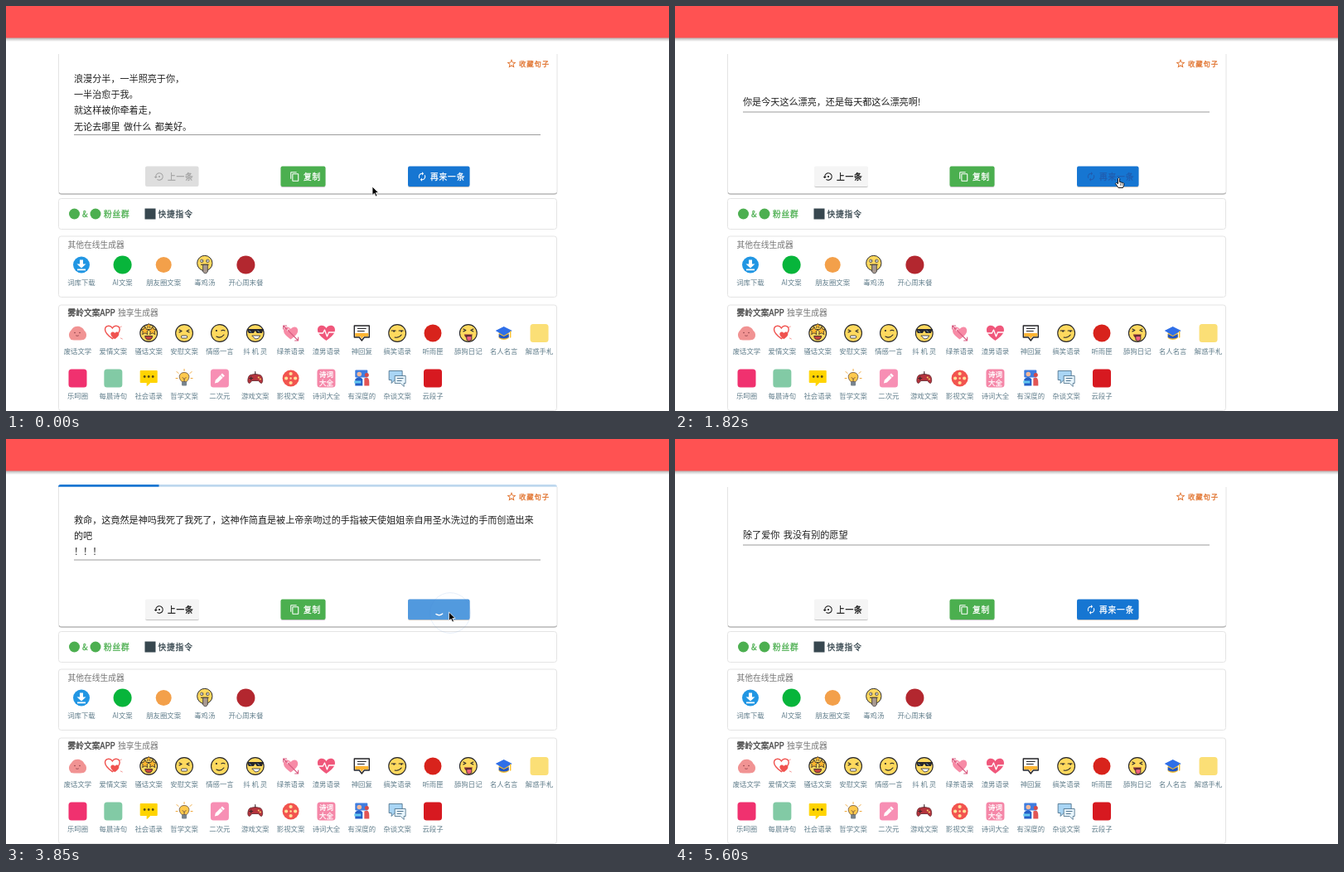
Write an HTML page that moves like this. It is 800 px wide and 489 px high and loops after 5.88 s.

```html
<!DOCTYPE html>
<html lang="zh-CN">
<head>
<meta charset="utf-8">
<title>文案生成器</title>
<style>
html, body { margin: 0; width: 100%; height: 100%; overflow: hidden; background: #fff; }
svg { display: block; width: 100%; height: 100%; }
text { font-family: "Noto Sans CJK SC", "Noto Sans CJK", "Noto Sans", sans-serif; white-space: pre; }
.mid { text-anchor: middle; }
.quote { word-spacing: 2px; }
.btn { letter-spacing: .87px; }
.btn, .med { font-weight: 500; stroke-width: .28px; }
.line { fill: none; stroke-linecap: round; stroke-linejoin: round; }
</style>
</head>
<body>
<svg id="stage" viewBox="0 0 800 489" xmlns="http://www.w3.org/2000/svg"></svg>
<script>
const LOOP = 5880;
const BLUE = '#1976d2', GREEN = '#4caf50', INK = '#26262a', YELLOW = '#ffd95e';

// Drawing helpers; text is placed by the vertical centre of its glyphs.
const text = (x, y, s, size, fill, cls = '') =>
  `<text x="${x}" y="${y + size * .38}" font-size="${size}" fill="${fill}" class="${cls}" ${/btn|med/.test(cls) ? `stroke="${fill}"` : ''}>${s}</text>`;
const at = (x, y, body, scale = 1) => `<g transform="translate(${x} ${y}) scale(${scale})">${body}</g>`;
const rect = (x, y, w, h, fill, r = 0, more = '') =>
  `<rect x="${x}" y="${y}" width="${w}" height="${h}" rx="${r}" fill="${fill}" ${more}/>`;
const disc = (x, y, r, fill, more = '') => `<circle cx="${x}" cy="${y}" r="${r}" fill="${fill}" ${more}/>`;
const path = (d, fill, more = '') => `<path d="${d}" fill="${fill}" ${more}/>`;
const line = (d, color = INK, w = 1.1) => `<path class="line" d="${d}" stroke="${color}" stroke-width="${w}"/>`;
const glyph = (x, y, d, fill, scale = .53) => at(x, y, at(-12, -12, path(d, fill)), scale);
const tile = (fill, body = '') => rect(-11, -11, 22, 22, fill, 3.5) + body;
const thin = `stroke="${INK}" stroke-width=".8"`;
const face = body => disc(0, 0, 10.4, YELLOW, `stroke="${INK}" stroke-width="1.1"`) + body;
const star = (x, y, s) => at(x, y, path('M0-5 1.5-1.7 5-1.4 2.4 1 3.1 4.6 0 2.8-3.1 4.6-2.4 1-5-1.4-1.5-1.7Z', '#ffb52e', thin), s);
const HEART = 'M0 9C-7 4-10.500 .5-10.500-4C-10.500-10-3-11 0-6C3-11 10.500-10 10.500-4C10.500 .5 7 4 0 9Z';

const COPY = 'M16 1H4c-1.100 0-2 .9-2 2v14h2V3h12V1zm3 4H8c-1.100 0-2 .9-2 2v14c0 1.100.9 2 2 2h11c1.100 0 2-.9 2-2V7c0-1.100-.9-2-2-2zm0 16H8V7h11v14z';
const RESTORE = 'M14 12a2 2 0 1 0-4 0a2 2 0 1 0 4 0zM12 3a9 9 0 0 0-9 9H0l4 4 4-4H5a7 7 0 1 1 2.940 5.700l-1.420 1.440A9 9 0 1 0 12 3z';
const RENEW = 'M12 6v3l4-4-4-4v3a8 8 0 0 0-6.760 12.260L6.700 14.800A6 6 0 0 1 12 6zm6.760 1.740L17.300 9.200A6 6 0 0 1 12 18v-3l-4 4 4 4v-3a8 8 0 0 0 6.760-12.260z';
const STAR = 'M22 9.240l-7.190-.62L12 2 9.190 8.630 2 9.240l5.460 4.730L5.820 21 12 17.270 18.180 21l-1.630-7.030zM12 15.400l-3.760 2.270 1-4.280-3.320-2.880 4.380-.38L12 6.100l1.710 4.040 4.380.38-3.320 2.880 1 4.280z';

const onlineTools = [
  ['词库下载', disc(0, 0, 10, '#2196e3') + path('M-2-6H2V-1H5.500L0 4-5.500-1H-2ZM-5 5H5V6.800H-5Z', '#fff')],
  ['AI文案', disc(0, 0, 11, '#07b53b')],
  ['朋友圈文案', disc(0, 0, 9.5, '#f3a04a')],
  ['毒鸡汤', at(0, -2, face(disc(-4, -3, 2, '#fff', thin) + disc(4, -3, 2, '#fff', thin) + disc(-3.5, -3, .8, INK) + disc(3.5, -3, .8, INK) +
    line('M-5 2H5') + path('M-2.500 2H4V12Q1 16-2.500 12Z', '#a99a90', thin)), .88)],
  ['开心周末餐', disc(0, 0, 11, '#b3272f')]
];

const appTools = [
  ['废话文学', path('M-10 5C-12-1-8-3-6-6C-2-10 6-8 8-3C12 0 11 7 7 8Q-1 9-8 8Z', '#f19393') +
    disc(-3.5, -.5, .8, '#8d3f49') + disc(2.5, -.5, .8, '#8d3f49') + line('M-2 3Q-.5 4 1 3', '#8d3f49', .8)],
  ['爱情文案', at(-1, -1, path(HEART, '#fff', 'stroke="#f0524f" stroke-width="1.700"'), .84) +
    at(2, 3, path(HEART, '#f0524f'), .48) + line('M8-7 10-8M9 6 11 7', '#f59a98', 1)],
  ['骚话文案', face(star(-4.5, -3, 1) + star(4.5, -3, 1) + path('M-4.500 3.500H4.500Q4 8 0 8T-4.500 3.500Z', '#c2453f', thin)) + star(0, -9, .6)],
  ['安慰文案', face(line('M-6-4-3-2.500-6-1M6-4 3-2.500 6-1') + rect(-3.5, 3, 7, 3, '#fff', 1, thin))],
  ['情感一言', face(disc(-4, -3, 1.1, INK) + line('M2-3Q4-4.500 6-3M-4 4Q1 7 5 2'))],
  ['抖 机 灵', face(path('M-10-5H10L8 0H2L0-3-2 0H-8Z', INK) + line('M-7-3-5-1M3-3 5-1', '#7ea6ce', 1) +
    path('M-4 3H6Q4 8 0 7Z', '#fff', thin))],
  ['绿茶语录', at(0, 0, path(HEART, '#f78ba6'), .82) + line('M-9-9 9 9M5 9H9V5M-9-5V-9H-5', '#d95f83', 1.1) + line('M-4-3Q-5-5-2-5', '#fff', 1)],
  ['渣男语录', path(HEART, '#f0577b') + line('M-10 0H-4L-2-4 1 4 3-1H10', '#fff', 1.3)],
  ['神回复', path('M-9-9H9V5H3L0 9-3 5H-9Z', '#fff', `stroke="${INK}" stroke-width="1.4" stroke-linejoin="round"`) +
    path('M-8 0H8V4H2L0 7-2 4H-8Z', '#ffb534') + line('M-5-5.500H5M-5-2.500H3', INK, 1)],
  ['搞笑语录', face(line('M-7-3H-2M2-3H7') + disc(-4, -2.3, 1, INK) + disc(5, -2.3, 1, INK) + line('M-3 5Q2 6 5 2'))],
  ['听雨匣', disc(0, 0, 10.5, '#d8231c')],
  ['舔狗日记', face(line('M-6-5-3-3.500-6-2M6-5 3-3.500 6-2') + path('M-5 1.500H5Q4 6 0 6T-5 1.500Z', '#7b2d35') +
    path('M-2 3.500H4V8Q1 11-2 8Z', '#f2607b', thin))],
  ['名人名言', path('M-6-1V6Q0 10 6 6V-1Z', '#fbc02d') + path('M0-8 10-3 0 3-10-3Z', '#2f6fe8') +
    path('M-6 1 0 4 6 1V5Q0 8-6 5Z', '#1f55c6') + line('M8-2V5', '#fbc02d', 1.4)],
  ['解惑手札', tile('#fbdf76')],
  ['乐呵圈', tile('#f0316f')],
  ['每晨诗句', tile('#82caa5')],
  ['社会语录', path('M-10-9H10V5H2L-2 9V5H-10Z', '#ffd400', 'stroke="#ffd400" stroke-linejoin="round"') +
    [-5, 0, 5].map(x => disc(x, -2, 1.4, '#5a4a16')).join('')],
  ['哲学文案', path('M-3 4C-8-1-6-7 0-7S8-1 3 4Z', '#ffc94d', 'stroke="#604b3d" stroke-width=".8"') + rect(-3, 4, 6, 5, '#78848e', 1) +
    line('M-2-1 0 1 2-1M0 1V4', '#604b3d', .9) + line('M0-11V-9M-9-8-7-6M9-8 7-6M-10 0H-8M10 0H8', '#f0a83b', 1)],
  ['二次元', tile('#f78fb4', path('M-6 6-5 2 3-6 6-3-2 5Z', '#fff') + line('M1-4 4-1', '#f78fb4', 1))],
  ['游戏文案', path('M-6-4Q0-6 6-4C9-3 10 5 7.500 6Q6 6 4 3H-4Q-6 6-7.500 6C-10 5-9-3-6-4Z', '#b5343d', 'stroke="#5d262d" stroke-width=".8"') +
    line('M-5-2V2M-7 0H-3M0-5V-8', '#3b2529', 1.1) + disc(4, -1, 1, '#ffd86b') + disc(6, 1, 1, '#ffd86b')],
  ['影视文案', disc(0, 0, 10, '#f2544f') + [[0, -5.5], [5.5, 0], [0, 5.5], [-5.5, 0]].map(p => disc(p[0], p[1], 2.1, '#ffe09a')).join('') + disc(0, 0, 1.2, '#ffe09a')],
  ['诗词大全', tile('#f587a8', text(0, -4.5, '诗词', 8.5, '#fff', 'mid med') + text(0, 5, '大全', 8.5, '#fff', 'mid med'))],
  ['有深度的', rect(-8, -10, 15, 9, '#3f7de0', 1) + disc(-3, -5, 2.8, '#f2b89a') + disc(6, -4, 2.5, '#d34b4b') +
    path('M-8 9V1Q-3-4 1 1V9Z', '#2460c8') + path('M3 9V0Q9-3 9 5V9Z', '#e25555') + rect(-9, 3, 8, 3, '#64c7ef')],
  ['杂谈文案', path('M-10-9H6V2H-3L-7 6V2H-10Z', '#a9d5f4', 'stroke="#426985" stroke-width=".8"') +
    path('M-3-3H10V6H8V10L4 6H-3Z', '#e8f5fd', 'stroke="#426985" stroke-width=".8"') + line('M0 0H7M0 3H5', '#426985', .9)],
  ['云段子', tile('#d71920')]
];

const toolIcon = ([label, icon], x, y, gap) => at(x, y, icon) + text(x, y + gap, label, 8.4, '#607d8b', 'mid');
const box = (y, h) => rect(63.5, y + .5, 601, h, '#fff', 3, 'stroke="#e4e4e4"');

const quotes = [
  { y: 87.4, rule: 155.5, lines: ['浪漫分半，一半照亮于你，', '一半治愈于我。', '就这样被你牵着走，', '无论去哪里 做什么 都美好。'] },
  { y: 115.3, rule: 128, lines: ['你是今天这么漂亮，还是每天都这么漂亮啊!'] },
  { y: 97.3, rule: 146, lines: ['救命，这竟然是神吗我死了我死了，这神作简直是被上帝亲吻过的手指被天使姐姐亲自用圣水洗过的手而创造出来', '的吧', '！！！'] },
  { y: 115.3, rule: 128, lines: ['不要再撩头发了，来撩我吧！'] },
  { y: 115.3, rule: 128, lines: ['除了爱你 我没有别的愿望'] }
];
const quoteSvg = q => q.lines.map((s, i) => text(82, q.y + i * 19.4, s, 11.1, '#212121', 'quote')).join('') +
  rect(82, q.rule - .5, 563, 1, '#9c9c9c');

const stage = document.getElementById('stage');
stage.innerHTML = `
<defs>
  <filter id="lift" x="-10%" y="-30%" width="120%" height="170%">
    <feDropShadow dx="0" dy=".9" stdDeviation=".7" flood-opacity=".26"/>
  </filter>
  <linearGradient id="fade" x2="0" y2="1"><stop stop-color="#000" stop-opacity=".32"/><stop offset="1" stop-color="#000" stop-opacity="0"/></linearGradient>
  <clipPath id="cardClip"><rect x="63" y="55" width="602" height="172" rx="3"/></clipPath>
</defs>` +
  rect(0, 0, 800, 489, '#fff') + rect(0, 38, 800, 5, 'url(#fade)') + rect(0, 0, 800, 38.5, '#ff5252') +
  path('M63.500 58V224Q63.500 227 66.500 227H662Q665 227 665 224V58', 'none', 'stroke="#e4e4e4"') +
  path('M64 225.500Q65 227 67 227H661Q664 227 664.500 225.500', 'none', 'stroke="#bababa" stroke-width="1.400"') +
  `<g id="bar" clip-path="url(#cardClip)">${rect(63, 55, 602, 2.7, '#bdd7ee')}<rect id="barFill" y="55" height="2.700" fill="${BLUE}"/></g>` +
  glyph(610, 69.5, STAR, '#e0702a', .55) + text(619, 70, '收藏句子', 8.4, '#e0702a', 'btn') +
  '<g id="quote"></g>' +
  `<g id="prevOff">${rect(168, 193.5, 64.5, 24.5, '#dedede', 2)}${glyph(185, 206, RESTORE, '#a2a2a2')}${text(195, 206, '上一条', 9.7, '#a2a2a2', 'btn')}</g>` +
  `<g id="prevOn">${rect(168, 193.5, 65, 24.5, '#f5f5f5', 2, 'filter="url(#lift)"')}${glyph(185, 206, RESTORE, '#111')}${text(195, 206, '上一条', 9.7, '#111', 'btn')}</g>` +
  rect(331.5, 193.5, 54, 24.5, GREEN, 2, 'filter="url(#lift)"') + glyph(348.5, 206, COPY, '#fff') + text(359, 206, '复制', 9.7, '#fff', 'btn') +
  rect(485, 193.5, 74.5, 24.5, BLUE, 2, 'filter="url(#lift)"') +
  rect(485, 193.5, 74.5, 24.5, '#fff', 2, 'id="flash"') +
  `<g id="nextLabel">${glyph(502, 206, RENEW, 'currentColor')}${text(512, 206, '再来一条', 9.7, 'currentColor', 'btn')}</g>` +
  '<path id="spinner" class="line" stroke="#fff" stroke-width="1.500"/>' +
  box(232, 37) + disc(82.5, 251, 6.5, GREEN) + text(92, 251, '&amp;', 9.7, GREEN, 'med') + disc(108, 251, 6.5, GREEN) +
  text(118, 251, '粉丝群', 9.7, GREEN, 'btn') + rect(167.5, 244.5, 13, 13, '#37474f') + text(183.5, 251, '快捷指令', 9.7, '#37474f', 'btn') +
  box(277.5, 73.5) + text(74.5, 288, '其他在线生成器', 9.75, '#757575') +
  onlineTools.map((tool, i) => toolIcon(tool, 91 + i * 49.6, 312.5, 21.7)).join('') +
  box(360.5, 127.5) + text(74.5, 370.5, '雾岭文案APP <tspan dx="1" fill="#757575" stroke="none" font-weight="400">独享生成器</tspan>', 9.75, '#424242', 'med') +
  appTools.map((tool, i) => toolIcon(tool, 86.5 + i % 14 * 42.85, i < 14 ? 395 : 449.5, 21.5)).join('') +
  '<circle id="ring"/>' +
  `<g id="arrow">${path('M0 0V10.500L2.500 8.200 4.200 12 6 11.200 4.300 7.500H7.700Z', '#000', 'stroke="#fff" stroke-width=".8"')}</g>` +
  `<g id="hand">${path('M-1 1Q0-1 1 1V5L5 6Q7 6 6 9L5 12H-.5L-4 7Q-3.500 5-1 7Z', '#fff', 'stroke="#111"')}${line('M2 7V9M4 7V9', '#111', .6)}</g>`;

const el = {};
stage.querySelectorAll('[id]').forEach(node => el[node.id] = node);
const show = (node, on) => node.style.display = on ? '' : 'none';
const set = (node, attrs) => { for (const k in attrs) node.setAttribute(k, attrs[k]); };
const clamp = (v, a = 0, b = 1) => Math.max(a, Math.min(b, v));

// Each click: press time, loading start and end, ring centre.
const clicks = [
  { press: 860, start: 1400, end: 1790, x: 531, y: 206 },
  { press: 2560, start: 2634, end: 3010, x: 536, y: 205.5 },
  { press: 3660, start: 3740, end: 4110, x: 536, y: 210 },
  { press: 4935, start: 5015, end: 5360, x: 534.5, y: 210.5 }
];
const route = [[0, 442, 218], [60, 442, 218], [840, 530, 205], [910, 530, 205], [1400, 536, 207], [2634, 536, 205],
  [3740, 534.5, 209], [4990, 534, 209], [5110, 424, 397], [5200, 340, 540], [LOOP, 340, 540]];

function cursorAt(t) {
  const i = route.findIndex(p => p[0] > t), a = route[i - 1], b = route[i];
  let k = (t - a[0]) / (b[0] - a[0]);
  if (i < 6) k = k * k * (3 - 2 * k);
  return [a[1] + (b[1] - a[1]) * k, a[2] + (b[2] - a[2]) * k];
}

function drawLoading(dt) {
  const x = dt / 1260, p = 1.25 * x - .5 * x * x;
  const left = Math.max(0, -.35 + 1.35 * p), right = Math.min(1, 1.9 * p);
  set(el.barFill, { x: 63 + 602 * left, width: 602 * (right - left) });
  const tail = 19 + .28 * dt, head = Math.min(Math.max(tail + 2, 1 + 1.1 * dt), tail + 250);
  const point = deg => `${522.5 + 6.5 * Math.cos(deg * Math.PI / 180)} ${206 + 6.5 * Math.sin(deg * Math.PI / 180)}`;
  set(el.spinner, { d: `M${point(tail)}A6.5 6.5 0 ${head - tail > 180 ? 1 : 0} 1 ${point(head)}` });
}

let shownQuote = -1;
function render(t) {
  const loading = clicks.find(c => t >= c.start && t < c.end);
  const done = clicks.filter(c => t >= c.end);
  const active = clicks.find(c => t >= c.press && t < c.start + 135);

  if (done.length !== shownQuote) {
    shownQuote = done.length;
    el.quote.innerHTML = quoteSvg(quotes[shownQuote]);
  }
  show(el.prevOff, !done.length);
  show(el.prevOn, done.length);

  show(el.bar, loading);
  show(el.spinner, loading);
  show(el.nextLabel, !loading);
  if (loading) drawLoading(t - loading.start);
  set(el.flash, { opacity: loading ? .4 * clamp(1 - (t - loading.start) / 300) : 0 });

  const k = done.length ? clamp((t - done[done.length - 1].end) / 200) ** 2 : 1;
  el.nextLabel.style.color = `rgb(${[28, 88, 172].map(c => Math.round(c + (255 - c) * k))})`;

  show(el.ring, active);
  if (active) {
    const dt = t - active.start, grow = clamp((t - active.press) / 50);
    set(el.ring, {
      cx: active.x, cy: active.y, r: dt < 0 ? 14.5 * grow : 15.5 + .08 * dt,
      fill: 'rgba(150,185,235,.14)', stroke: dt < 0 ? '#9bb8de' : '#4c87d6',
      'stroke-width': dt > 60 ? 1 : 1.8, opacity: dt < 0 ? .7 : clamp(.95 - dt / 135)
    });
  }

  const [x, y] = cursorAt(t);
  const hovering = t > 950 && t < 5015 && !loading;
  show(el.arrow, !hovering);
  show(el.hand, hovering);
  set(el.arrow, { transform: `translate(${x} ${y})` });
  set(el.hand, { transform: `translate(${x - .5} ${y + 1})` });
}

const begin = performance.now();
function tick(now) {
  render(Math.max(0, now - begin) % LOOP);
  requestAnimationFrame(tick);
}
render(0);
requestAnimationFrame(tick);
</script>
</body>
</html>
```
